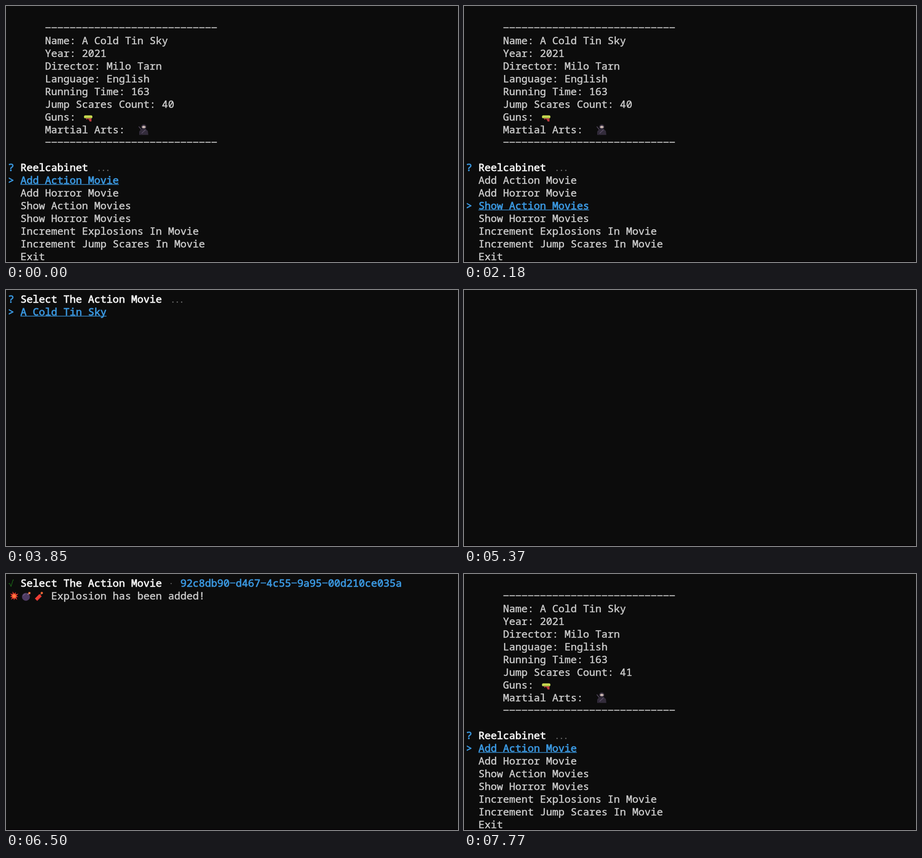
Animation of 994x563 px, one loop 9.89 s. Source, as an HTML page with a canvas:

```html
<!DOCTYPE html>
<html lang="en">
<head>
<meta charset="utf-8">
<title>Movie menu</title>
<style>
  html, body { margin: 0; width: 100%; height: 100%; overflow: hidden; background: #0c0c0c; }
  canvas { display: block; }
</style>
</head>
<body>
<canvas id="stage" width="994" height="563"></canvas>
<script>
const ctx = document.getElementById('stage').getContext('2d');
const LOOP = 9890;
const CELL = 13.53;
const FONT = `${CELL / 0.6}px "Noto Sans Mono", "DejaVu Sans Mono", monospace`;
const COLOR = { bg: '#0c0c0c', text: '#cccccc', bright: '#f2f2f2', blue: '#3a96dd', dim: '#686868', green: '#1d6a19' };
const REGULAR = 0.55;
const HEAVY = 0.95;
const TITLE = 'A Cold Tin Sky';
const MENU = [
  'Add Action Movie', 'Add Horror Movie', 'Show Action Movies', 'Show Horror Movies',
  'Increment Explosions In Movie', 'Increment Jump Scares In Movie', 'Exit'
];

const colX = col => 4.6 + col * CELL;
const baseline = row => Math.round(28 + 27.95 * row);

function rect(x, y, w, h, color) {
  ctx.fillStyle = color;
  ctx.fillRect(x, y, w, h);
}

function shape(color, ...points) {
  ctx.fillStyle = color;
  ctx.beginPath();
  points.forEach(([x, y]) => ctx.lineTo(x, y));
  ctx.fill();
}

function disc(x, y, r, color) {
  ctx.fillStyle = color;
  ctx.beginPath();
  ctx.arc(x, y, r, 0, Math.PI * 2);
  ctx.fill();
}

function stroke(color, width, ...points) {
  ctx.strokeStyle = color;
  ctx.lineWidth = width;
  ctx.beginPath();
  points.forEach(([x, y]) => ctx.lineTo(x, y));
  ctx.stroke();
}

// Every character sits in its own terminal cell; a thin outline sets its weight.
function write(row, col, text, color = COLOR.text, outline = REGULAR) {
  const y = baseline(row);
  ctx.font = FONT;
  ctx.lineJoin = 'round';
  [...text].forEach((char, i) => {
    const x = colX(col + i);
    if (char === '-') return rect(x + 0.8, y - 9.3, 11.9, 2, color);
    ctx.fillStyle = ctx.strokeStyle = color;
    ctx.lineWidth = outline;
    ctx.fillText(char, x, y);
    ctx.strokeText(char, x, y);
  });
}

function prompt(row, text) {
  write(row, 0, '?', COLOR.blue, HEAVY);
  write(row, 2, text, COLOR.bright, HEAVY);
  const x = colX(text.length + 4) + CELL / 2;
  for (const dx of [-9.6, 0, 9.6]) disc(x + dx, baseline(row) - 1.6, 1.5, COLOR.dim);
}

function choices(row, items, selected) {
  items.forEach((item, i) => {
    const active = i === selected;
    write(row + i, 2, item, active ? COLOR.blue : COLOR.text, active ? HEAVY : REGULAR);
    if (!active) return;
    write(row + i, 0, '>', COLOR.blue, HEAVY);
    rect(colX(2), baseline(row + i) + 0.8, item.length * CELL, 1.4, COLOR.blue);
  });
}

function menu(row, selected) {
  prompt(row, 'Reelcabinet');
  choices(row + 1, MENU, selected);
}

function waterGun() {
  shape('#b5383c', [176, 247], [188, 247], [188, 254], [184, 254], [182, 250], [177, 250]);
  rect(179, 248, 2, 2, COLOR.bg);
  ctx.fillStyle = '#c8d850';
  ctx.beginPath();
  ctx.roundRect(171.5, 240.5, 18.5, 6.5, 3);
  ctx.fill();
  rect(174, 245, 14, 1.5, '#94ad3c');
}

function ninja() {
  const cloth = '#332c3b';
  stroke('#574a62', 1.6, [292, 265], [300, 275]);
  shape(cloth, [293, 283.5], [293, 276], [297, 271], [308, 271], [312, 275], [313, 283.5]);
  disc(303, 266, 5.8, cloth);
  ctx.fillStyle = '#e2cdc4';
  ctx.beginPath();
  ctx.ellipse(303, 266, 3.8, 2.6, 0, 0, Math.PI * 2);
  ctx.fill();
  disc(301.3, 266, 0.7, cloth);
  disc(304.7, 266, 0.7, cloth);
  stroke('#5f526b', 1.5, [307, 272], [297, 281]);
  stroke('#211a29', 1.2, [297, 278], [297, 283.5]);
}

function burst(cx, cy, outer, inner, color) {
  const points = Array.from({ length: 18 }, (_, i) => {
    const r = i % 2 ? inner : outer * (i % 4 ? 0.86 : 1);
    const a = i * Math.PI / 9 - 1.9;
    return [cx + r * Math.cos(a), cy + r * Math.sin(a)];
  });
  shape(color, ...points);
}

function explosives() {
  burst(18, 48.5, 10.8, 5, '#e8382e');
  burst(18, 48.5, 6, 3, '#ff7a3d');

  disc(43.8, 50.2, 8.7, '#4d3a62');
  stroke('#75648a', 1.3, [38, 48], [40, 45], [43, 44]);
  stroke('#75648a', 3, [47.5, 45.5], [50, 43]);
  burst(51.5, 42, 3.8, 1.9, '#e95c38');
  disc(51.5, 42, 1.2, '#f6c55b');

  stroke('#ef3e35', 7, [66, 56.5], [76, 46.5]);
  stroke('#c92b30', 1.2, [68.2, 58.8], [78.2, 48.8]);
  stroke('#8d6556', 1.4, [75.5, 46], [78, 43]);
  disc(78.7, 41.8, 2.5, '#f06936');
}

function movieScreen(selected, count) {
  const lines = [
    '-'.repeat(28), `Name: ${TITLE}`, 'Year: 2021', 'Director: Milo Tarn', 'Language: English',
    'Running Time: 163', `Jump Scares Count: ${count}`, 'Guns:', 'Martial Arts:', '-'.repeat(28)
  ];
  lines.forEach((line, i) => write(i + 1, 6, line));
  waterGun();
  ninja();
  menu(12, selected);
}

function pickScreen() {
  prompt(0, 'Select The Action Movie');
  choices(1, [TITLE], 0);
}

function addedScreen(selected) {
  stroke(COLOR.green, 1.3, [5.5, 21.5], [8, 20.5], [11, 27.5], [15.5, 13], [17, 13]);
  write(0, 2, 'Select The Action Movie', COLOR.bright, HEAVY);
  disc(colX(26.5), 21, 1.3, COLOR.dim);
  write(0, 28, '92c8db90-d467-4c55-9a95-00d210ce035a', COLOR.blue, HEAVY);
  explosives();
  write(1, 7, 'Explosion has been added!');
  if (selected !== undefined) menu(2, selected);
}

const TIMELINE = [
  [0, () => movieScreen(0, 40)],
  [1520, () => movieScreen(1, 40)],
  [2180, () => movieScreen(2, 40)],
  [2650, () => movieScreen(3, 40)],
  [3120, () => movieScreen(4, 40)],
  [3850, pickScreen],
  [5370, () => {}],
  [5430, () => addedScreen(0)],
  [6500, () => addedScreen()],
  [6570, () => addedScreen(1)],
  [6970, () => addedScreen(2)],
  [7770, () => movieScreen(0, 41)]
];

function render() {
  const time = performance.now() % LOOP;
  const [, draw] = TIMELINE.findLast(([start]) => time >= start);
  rect(0, 0, 994, 563, COLOR.bg);
  draw();
  rect(0, 561, 994, 2, '#060306');
  requestAnimationFrame(render);
}
render();
</script>
</body>
</html>
```
